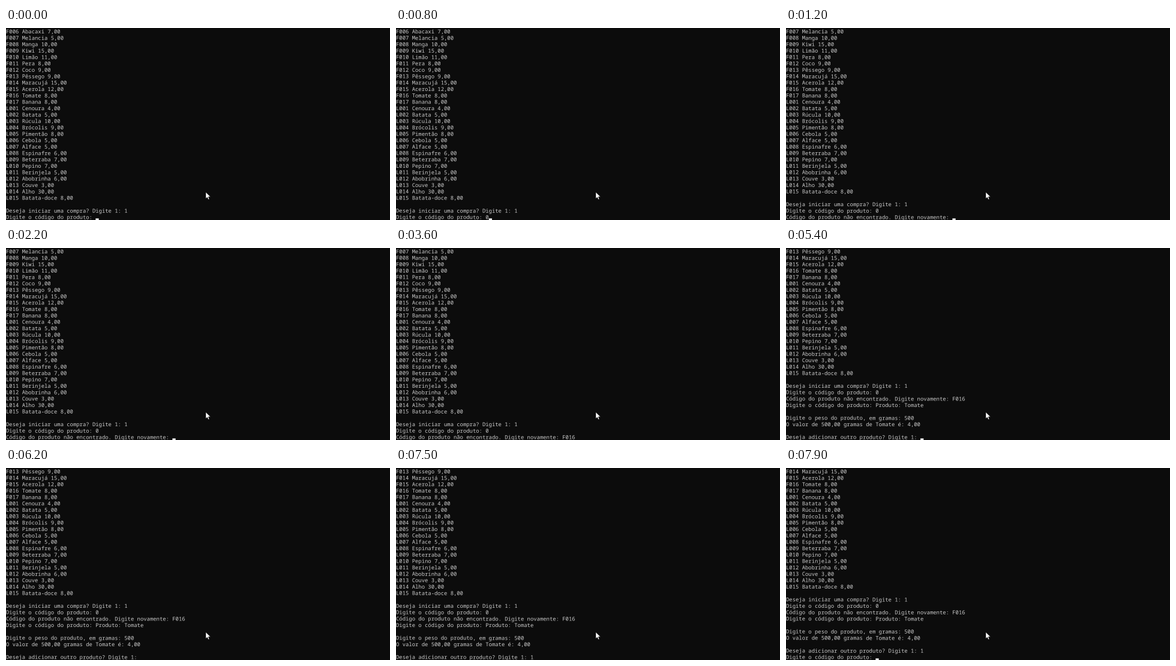
Write an HTML page that moves like this. It is 640 px wide and 320 px high and loops after 8 s.

```html
<!DOCTYPE html>
<html lang="pt-BR">
<head>
<meta charset="utf-8">
<title>Terminal</title>
<style>
  html, body { margin: 0; width: 100%; height: 100%; overflow: hidden; background: #0c0c0c; }
  /* 120 x 30 cells of 8 x 16, shown at two thirds */
  #term { position: absolute; left: 0; top: 0; width: 960px; height: 480px;
          transform: scale(.6666667); transform-origin: 0 0; }
  /* the hair of skew keeps baselines from snapping to whole pixels */
  pre { margin: 0; color: #ccc; font: 13.3333px/16px "Noto Sans Mono", "DejaVu Sans Mono", monospace;
        text-rendering: geometricPrecision; font-variant-ligatures: none;
        transform: translateY(.4px) skewY(.05deg); transform-origin: 0 0; }
  #caret { position: absolute; top: 476px; width: 8px; height: 4px; background: #f2f2f2; }
  svg { position: absolute; left: 498.5px; top: 410px; overflow: visible; }
</style>
</head>
<body>
<div id="term">
  <pre id="out"></pre>
  <div id="caret"></div>
  <svg width="13" height="20"><path d="M.5 .5V16.5L4.2 13L6.7 18.8L9.2 17.7L6.8 12H12Z" fill="#fff" stroke="#000" stroke-width=".6"/></svg>
</div>
<script>
const LOOP = 8000, ROWS = 30, CELL = 8;

const list = (letter, first, items) => items.split("|")
  .map((item, i) => `${letter}${String(first + i).padStart(3, "0")} ${item},00\n`).join("");

const ASK_CODE = "Digite o código do produto: ";
const START =
  list("F", 6, "Abacaxi 7|Melancia 5|Manga 10|Kiwi 15|Limão 11|Pera 8|Coco 9|Pêssego 9|Maracujá 15|Acerola 12|Tomate 8|Banana 8") +
  list("L", 1, "Cenoura 4|Batata 5|Rúcula 10|Brócolis 9|Pimentão 8|Cebola 5|Alface 5|Espinafre 6|Beterraba 7|Pepino 7|Berinjela 5|Abobrinha 6|Couve 3|Alho 30|Batata-doce 8") +
  "\nDeseja iniciar uma compra? Digite 1: 1\n" + ASK_CODE;

// [time in ms, text added, caret visible]
const steps = [
  [0, START, 1],
  [500, "0", 1],
  [900, "", 0],
  [1200, "\nCódigo do produto não encontrado. Digite novamente: ", 1],
  [1700, "", 0],
  [2150, "", 1],
  [2500, "F", 1],
  [2700, "", 0],
  [3100, "0", 1],
  [3300, "1", 1],
  [3500, "6", 1],
  [3600, "", 0],
  [3800, `\n${ASK_CODE}Produto: Tomate\n\nDigite o peso do produto, em gramas: `, 1],
  [4200, "", 0],
  [4700, "", 1],
  [4900, "5", 1],
  [5000, "0", 1],
  [5100, "0", 1],
  [5200, "", 0],
  [5400, "\nO valor de 500,00 gramas de Tomate é: 4,00\n\nDeseja adicionar outro produto? Digite 1: ", 1],
  [5900, "", 0],
  [6400, "", 1],
  [6750, "", 0],
  [7200, "1", 1],
  [7400, "", 0],
  [7800, "\n" + ASK_CODE, 1]
];

let log = "";
const states = steps.map(([time, text, caret]) => {
  log += text;
  const lines = log.split("\n").slice(-ROWS);
  return { time, caret, text: lines.join("\n"), col: lines[lines.length - 1].length };
});

const out = document.getElementById("out");
const caret = document.getElementById("caret");
let shown = null;

function draw() {
  const t = performance.now() % LOOP;
  const state = states.filter(s => s.time <= t).pop();
  if (state !== shown) {
    shown = state;
    out.textContent = state.text;
    caret.style.left = state.col * CELL + "px";
    caret.style.visibility = state.caret ? "visible" : "hidden";
  }
  requestAnimationFrame(draw);
}
draw();
</script>
</body>
</html>
```
